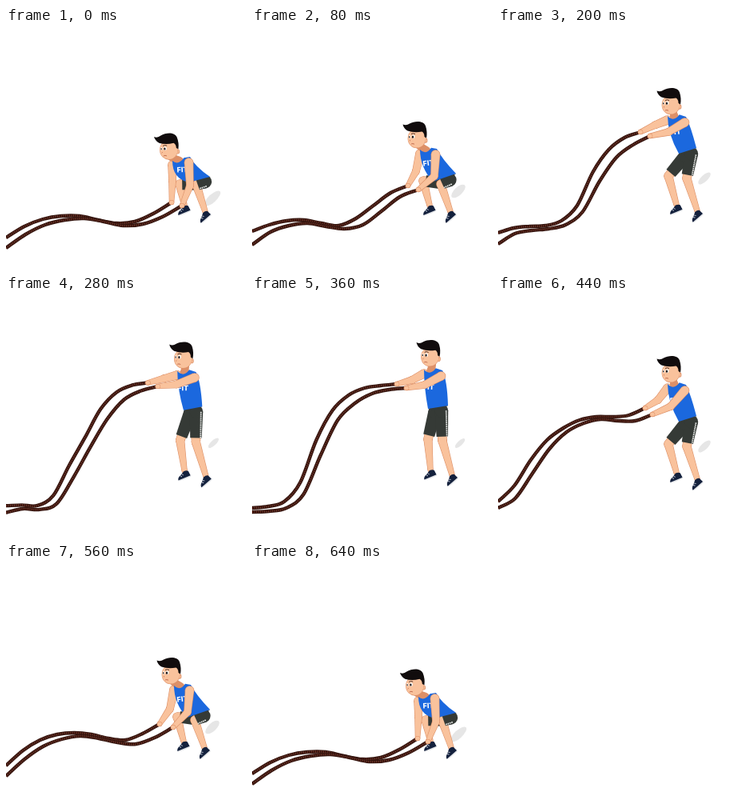
These frames come from a looping animation (300x300 px, 0.68 s). An HTML page with a canvas:

```html
<!DOCTYPE html>
<html lang="en">
<head>
<meta charset="utf-8">
<title>Battle ropes</title>
<style>
html, body { margin: 0; width: 100%; height: 100%; overflow: hidden; background: #fff; }
canvas { display: block; width: 300px; height: 300px; }
</style>
</head>
<body>
<canvas id="stage"></canvas>
<script>
const STEP = 40, STEPS = 17, CYCLE = 16;
const TIMES = [0, 2, 5, 9, 11, 14, 16];
const SKIN = '#f9c29c', EDGE = '#dd9068', BLUE = '#1b68de', DARK = '#353a36', NAVY = '#14213d';

const canvas = document.getElementById('stage');
const dpr = window.devicePixelRatio || 1;
canvas.width = canvas.height = 300 * dpr;
const c = canvas.getContext('2d');

// Body poses from squat to standing; the way down mirrors the way up.
const body = {
  head: [[203.5, 152.5, -.06], [206, 138, 0], [216, 96, 0], [222.5, 76, .03]],
  frontShoulder: [[207, 166], [209, 152], [211, 110], [214, 92]],
  backShoulder: [[231, 161], [232, 151], [236, 111], [239, 93]],
  backWaist: [[255, 186], [255, 182], [248, 150], [245, 137]],
  frontWaist: [[228, 193], [226, 192], [226, 157], [220, 141]],
  nearKnee: [[238, 196], [236, 195], [236, 188], [238, 181]],
  farKnee: [[217, 195], [214, 191], [213, 185], [220, 179]],
  nearFoot: [[248, 236], [247, 236], [248, 235], [249, 230]],
  farFoot: [[222, 228], [221, 228], [222, 227], [222, 223.5]],
  shadow: [[258, 213, 13, 5], [258, 204, 11, 5], [258, 188, 10, 4], [260, 184, 8, 3]]
};
// Arms lag behind, so up and down differ.
const arms = {
  nearElbow: [[230, 197], [228, 185], [213, 130], [216, 111], [216, 138], [227, 185]],
  nearHand: [[220, 222], [208, 202], [190, 135], [193, 115], [193, 148], [209, 204]],
  farElbow: [[208, 191], [205, 179], [197, 121], [200, 105], [200, 130], [205, 181]],
  farHand: [[207, 218], [195, 197], [178, 130], [181, 110], [184, 140], [192, 200]]
};
// Rope heights at equal steps from the left edge to the hand.
const farRope = [
  [262, 248, 239, 235, 235, 240, 244, 242, 232],
  [254, 246, 241, 240, 244, 247, 238, 222, 206],
  [256, 250, 248, 247, 241, 222, 180, 152, 137],
  [265, 263, 257, 233, 180, 143, 124, 115, 112],
  [257, 237, 205, 180, 165, 155, 151, 151, 149],
  [252, 233, 220, 213, 211, 213, 218, 220, 212]
];
const nearRope = [
  [275, 258, 246, 240, 238, 242, 247, 245, 236],
  [271, 255, 247, 244, 248, 251, 246, 229, 211],
  [270, 257, 253, 251, 246, 230, 192, 162, 146],
  [270, 269, 265, 248, 199, 155, 134, 122, 117],
  [265, 253, 222, 191, 170, 159, 154, 156, 156],
  [265, 244, 228, 219, 215, 218, 223, 225, 217]
];

const mirror = k => [k[0], k[1], k[2], k[3], k[2], k[1]];
for (const name in body) body[name] = mirror(body[name]);

// Smooth periodic interpolation through the key poses.
function slope(keys, k, n) {
  const i = k % 6, p = (i + 5) % 6, q = (i + 1) % 6;
  const h1 = TIMES[p + 1] - TIMES[p], h2 = TIMES[i + 1] - TIMES[i];
  const s1 = (keys[i][n] - keys[p][n]) / h1, s2 = (keys[q][n] - keys[i][n]) / h2;
  return (s1 * h2 + s2 * h1) / (h1 + h2);
}
function sample(keys, t) {
  let k = 0;
  while (k < 5 && t >= TIMES[k + 1]) k++;
  const h = TIMES[k + 1] - TIMES[k], u = (t - TIMES[k]) / h;
  const a = keys[k], b = keys[(k + 1) % 6], v = u * u * (3 - 2 * u);
  return a.map((x, n) => x + (b[n] - x) * v
    + h * slope(keys, k, n) * u * (1 - u) * (1 - u)
    - h * slope(keys, k + 1, n) * u * u * (1 - u));
}

const mix = (a, b, u) => [a[0] + (b[0] - a[0]) * u, a[1] + (b[1] - a[1]) * u];
const add = (a, x, y) => [a[0] + x, a[1] + y];

function fill(path, color) { c.fillStyle = color; c.fill(path); }
function ellipse(x, y, rx, ry, color, turn = 0) {
  c.beginPath();
  c.ellipse(x, y, rx, ry, turn, 0, 7);
  c.fillStyle = color;
  c.fill();
}
function poly(points, color) {
  c.beginPath();
  points.forEach(p => c.lineTo(p[0], p[1]));
  c.closePath();
  c.fillStyle = color;
  c.fill();
}
function taper(a, b, ra, rb, color, flat) {
  const d = Math.atan2(b[1] - a[1], b[0] - a[0]), x = -Math.sin(d), y = Math.cos(d);
  poly([add(a, x * ra, y * ra), add(b, x * rb, y * rb), add(b, -x * rb, -y * rb), add(a, -x * ra, -y * ra)], color);
  ellipse(a[0], a[1], ra, ra, color);
  if (!flat) ellipse(b[0], b[1], rb, rb, color);
}
function limb(a, b, d, ra, rb, rd) {
  for (const [o, color] of [[.4, EDGE], [-.2, SKIN]]) {
    taper(a, b, ra + o, rb + o, color);
    taper(b, d, rb + o, rd + o, color);
  }
}

function rope(keys, hand, t) {
  const ys = sample(keys, t), pts = ys.map((y, j) => [hand[0] * j / 9, y]);
  pts.push(hand);
  const first = pts[0], second = pts[1];
  pts.unshift([-second[0], 2 * first[1] - second[1]]);
  pts.push(add(hand, hand[0] - pts[9][0], hand[1] - pts[9][1]));
  c.beginPath();
  c.moveTo(first[0], first[1]);
  for (let j = 1; j < 10; j++) {
    const [o, a, b, e] = pts.slice(j - 1, j + 3);
    c.bezierCurveTo(a[0] + (b[0] - o[0]) / 6, a[1] + (b[1] - o[1]) / 6,
      b[0] - (e[0] - a[0]) / 6, b[1] - (e[1] - a[1]) / 6, b[0], b[1]);
  }
  c.lineWidth = 4.4;
  c.strokeStyle = '#32130d';
  c.stroke();
  c.setLineDash([1, 1.5]);
  c.lineWidth = 2.5;
  c.strokeStyle = '#75372a';
  c.stroke();
  c.setLineDash([]);
}

function shoe(p, turn) {
  c.save();
  c.translate(p[0], p[1]);
  c.rotate(turn);
  fill(new Path2D('M-8.5 3.5Q-7 5 8 4.5L8 2H-8Z'), '#e3e5e8');
  fill(new Path2D('M-8.5 3Q-8-.5-3-2L2-5Q6-5 7.5-3L8 3Z'), NAVY);
  c.strokeStyle = '#dfe4ee';
  c.lineWidth = .8;
  c.stroke(new Path2D('M-4-1.3L-2.5 .5M-1.5-2.5L0-.7'));
  c.restore();
}

function leg(hip, knee, foot, turn, stripe) {
  const hem = mix(hip, knee, .86);
  limb(mix(hip, knee, .7), knee, add(foot, 1, -6.5), 6, 5.2, 3.2);
  shoe(foot, turn);
  taper(hip, hem, 8.3, 7.2, DARK, true);
  if (!stripe) return;
  const d = Math.atan2(knee[1] - hip[1], knee[0] - hip[0]);
  const x = Math.sin(d) * 5.8, y = -Math.cos(d) * 5.8;
  c.beginPath();
  c.moveTo(hip[0] + x, hip[1] + y);
  c.lineTo(hem[0] + x, hem[1] + y);
  c.setLineDash([1.6, .8]);
  c.lineWidth = 1.8;
  c.strokeStyle = '#eef0ee';
  c.stroke();
  c.setLineDash([]);
}

function arm(shoulder, elbow, hand) {
  limb(shoulder, elbow, hand, 5.4, 4.4, 2.8);
  ellipse(hand[0], hand[1], 3.3, 3, EDGE);
  ellipse(hand[0], hand[1], 2.8, 2.5, SKIN);
}

function head([x, y, turn]) {
  c.save();
  c.translate(x, y);
  c.rotate(turn);
  ellipse(10.8, 2.5, 2.6, 3.2, EDGE);
  ellipse(10.6, 2.5, 2, 2.6, SKIN);
  ellipse(0, 0, 11.4, 12.2, EDGE);
  ellipse(0, -.2, 11, 11.8, SKIN);
  fill(new Path2D('M-17.5-17.5Q-13-15.5-9-18.5C-2-22.5 9-22 11-15.5Q13.5-8 12-.5L9.5-2Q9.5-7 6.5-8.5Q-3-6.5-11.5-9.5Q-16.5-12.5-17.5-17.5Z'), '#110c0d');
  ellipse(-4.5, -2.2, 2, 2.4, '#fff');
  ellipse(-9, -2, 1.2, 2, '#fff');
  ellipse(-5, -1.8, 1.1, 1.6, '#18100f');
  ellipse(-9.3, -1.8, .6, 1.2, '#18100f');
  c.strokeStyle = '#3a2019';
  c.lineWidth = .9;
  c.stroke(new Path2D('M-7-5.5Q-4.5-7-2-5.5'));
  c.strokeStyle = '#bd6549';
  c.stroke(new Path2D('M-7 7Q-5 6-3 7.2M-8 2.5L-9 3'));
  c.restore();
}

function vest(p) {
  const { frontShoulder: f, backShoulder: b, backWaist: bw, frontWaist: fw } = p;
  const neck = mix(f, b, .35);
  taper(add(p.head, 3, 9), add(neck, 1, 2), 4.5, 5.5, EDGE);
  c.save();
  c.beginPath();
  c.moveTo(f[0] + 1, f[1]);
  c.quadraticCurveTo(neck[0], neck[1] + 8, neck[0] + 7, neck[1] - 2);
  c.lineTo(b[0] - 1, b[1]);
  c.quadraticCurveTo(b[0] + 5, b[1] + 12, bw[0], bw[1]);
  c.lineTo(fw[0], fw[1]);
  c.quadraticCurveTo(f[0] + 1, f[1] + 22, f[0] + 1, f[1]);
  c.fillStyle = BLUE;
  c.fill();
  c.clip();
  const mark = mix(f, fw, .46);
  c.translate(mark[0], mark[1]);
  c.rotate(Math.atan2(bw[1] - fw[1], bw[0] - fw[0]) + .2);
  c.fillStyle = '#fff';
  c.font = '800 9px Inter, sans-serif';
  c.fillText('FIT', -3, 2);
  c.restore();
}

function draw(t) {
  const p = {};
  for (const set of [body, arms]) for (const name in set) p[name] = sample(set[name], t);
  c.setTransform(dpr, 0, 0, dpr, 0, 0);
  c.fillStyle = '#fff';
  c.fillRect(0, 0, 300, 300);

  const [sx, sy, rx, ry] = p.shadow;
  ellipse(sx, sy, rx, ry, '#e6e6e6', -.75);

  const top = mix(p.frontShoulder, p.backShoulder, .5), waist = mix(p.frontWaist, p.backWaist, .5);
  const len = Math.hypot(waist[0] - top[0], waist[1] - top[1]) / 5;
  const dx = (waist[0] - top[0]) / len, dy = (waist[1] - top[1]) / len;
  const nearHip = add(mix(p.backWaist, p.frontWaist, .35), dx, dy);
  const farHip = add(mix(p.backWaist, p.frontWaist, .68), dx, dy);

  leg(farHip, p.farKnee, p.farFoot, -.4);
  poly([p.backWaist, p.frontWaist, farHip, nearHip], DARK);
  leg(nearHip, p.nearKnee, p.nearFoot, -.72, true);
  rope(farRope, p.farHand, t);
  arm(add(p.frontShoulder, 1, 5), p.farElbow, p.farHand);
  vest(p);
  head(p.head);
  rope(nearRope, p.nearHand, t);
  arm(add(p.backShoulder, -2.5, 7), p.nearElbow, p.nearHand);
}

function tick(now) {
  const step = Math.floor(now / STEP) % STEPS;
  draw(step % CYCLE);
  requestAnimationFrame(tick);
}
const start = performance.now();
const loop = now => { tickAt(Math.max(0, now - start)); requestAnimationFrame(loop); };
function tickAt(ms) { draw(Math.floor(ms / STEP) % STEPS % CYCLE); }
tickAt(0);
requestAnimationFrame(loop);
</script>
</body>
</html>
```
